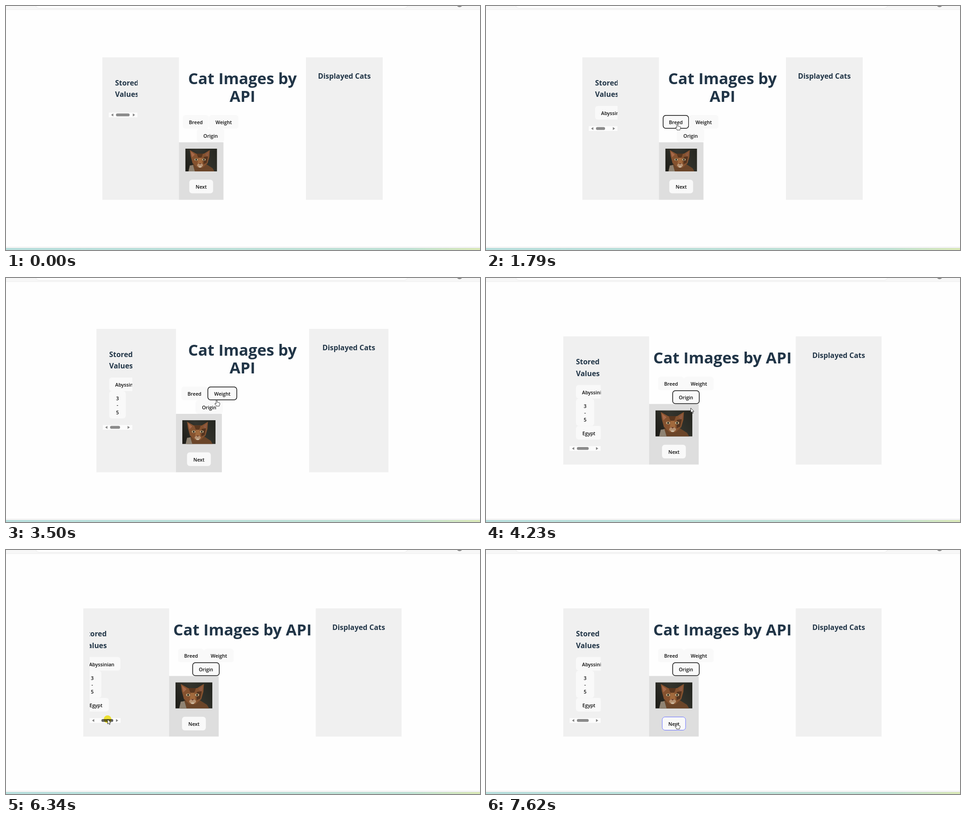
An HTML page with a canvas for the animation above (8 s loop, 1043 by 537 pixels).

```html
<!DOCTYPE html>
<html lang="en">
<head>
<meta charset="utf-8">
<title>Cat Images by API</title>
<style>
html, body { margin: 0; width: 100%; height: 100%; overflow: hidden; background: #fefefe; }
canvas { display: block; }
</style>
</head>
<body>
<canvas id="stage" width="1043" height="537"></canvas>
<script>
const ctx = document.getElementById('stage').getContext('2d');
const LOOP = 8000;
const FAMILY = '"Open Sans", "Noto Sans", sans-serif';
const INK = '#213547';

// The page re-centres itself each time the stored list grows.
const layouts = [
  { from: 0, top: 113, bottom: 426.5, left: 212, mid: 380.5, right: 660, end: 829, clip: 63.5,
    boxTop: 300, boxEnd: 478.5, imgH: 50, breed: 389, origin: 420.2 },
  { from: 2900, top: 112, bottom: 427.5, left: 199, mid: 374, right: 667, end: 841.5, clip: 65,
    boxTop: 299, boxEnd: 475, imgH: 52.5, breed: 386, origin: 417 },
  { from: 4230, top: 128.5, bottom: 410.5, left: 170, mid: 359, right: 681.5, end: 870.5, clip: 68.5,
    boxTop: 277.3, boxEnd: 468, imgH: 57.5, breed: 378.5, origin: 410 }
];

// Pointer path: time, x, y
const path = [
  [310, 934, 505], [520, 519, 323], [790, 519, 323], [1330, 421, 260],
  [2060, 421, 260], [2450, 466, 258], [3440, 466, 258], [3500, 463.5, 269], [3770, 450.5, 286],
  [4370, 450.5, 286], [5090, 213.5, 372.5], [5500, 213.5, 372.5], [6340, 223.5, 372.5],
  [6750, 213.5, 372.5], [6950, 213.5, 372.5], [7620, 420, 381]
];
const hovers = { Breed: [1130, 2200], Weight: [2260, 3500], Origin: [3500, 4230], Next: [7340, LOOP] };
const clicks = [[1520, 1790], [2710, 2900], [4040, 4230], [5360, 6750]];

const hand = new Path2D('M-1.2 7V.6Q0-1 1.2 .6V4.6Q2.4 3.8 3.3 5Q4.5 4.4 5.2 5.5Q6.8 5 7 6.5V9.2L5.8 11.8V13H-.8V12L-3.8 8.2Q-4 6.4-2.4 6.9L-1.2 8Z');
const arrow = new Path2D('M0 0V10.4L2.4 8.2L4 11.8L5.6 11L4.1 7.6H7.2Z');

const between = (t, [a, b]) => t >= a && t < b;

function pointerAt(t) {
  const i = path.findIndex(p => p[0] > t);
  if (i < 0) return path[path.length - 1].slice(1);
  const [t0, x0, y0] = path[i - 1], [t1, x1, y1] = path[i];
  const k = (t - t0) / (t1 - t0), e = k * k * (3 - 2 * k);
  return [x0 + (x1 - x0) * e, y0 + (y1 - y0) * e];
}

function rect(x, y, x2, y2, color) {
  ctx.fillStyle = color;
  ctx.fillRect(x, y, x2 - x, y2 - y);
}

function round(x, y, w, h, r, fill, stroke, line = 1) {
  ctx.beginPath();
  ctx.roundRect(x, y, w, h, r);
  if (fill) { ctx.fillStyle = fill; ctx.fill(); }
  if (stroke) { ctx.strokeStyle = stroke; ctx.lineWidth = line; ctx.stroke(); }
}

function polygon(color, ...points) {
  ctx.fillStyle = color;
  ctx.beginPath();
  for (let i = 0; i < points.length; i += 2) ctx.lineTo(points[i], points[i + 1]);
  ctx.fill();
}

function oval(x, y, rx, ry, color) {
  ctx.fillStyle = color;
  ctx.beginPath();
  ctx.ellipse(x, y, rx, ry, 0, 0, 7);
  ctx.fill();
}

function text(s, x, y, size, weight = 700, color = INK, align = 'center') {
  ctx.font = `${weight} ${size}px ${FAMILY}`;
  ctx.textAlign = align;
  ctx.fillStyle = color;
  ctx.fillText(s, x, y);
}

function button(lines, x, y, w, h = 30) {
  round(x, y, w, h, 6, '#f9f9f9');
  lines.forEach((s, i) => text(s, x + w / 2, y + 20 + i * 15.3, 10.7, 600, '#0b0b0b'));
}

function action(name, x, y, w, t, focused) {
  button([name], x, y, w);
  if (name === focused) {
    round(x + .7, y + .7, w - 1.4, 28.6, 6, null, '#101010', 1.5);
  } else if (between(t, hovers[name])) {
    ctx.globalAlpha = Math.min(1, (t - hovers[name][0]) / 250);
    round(x + .5, y + .5, w - 1, 29, 6, null, '#646cff');
    ctx.globalAlpha = 1;
  }
}

function browserFrame() {
  rect(0, 0, 1043, 537, '#fefefe');
  rect(0, 0, 1043, 7.5, '#f7f7f7');
  rect(0, 7.5, 1043, 8.5, '#ececec');
  round(65, -14, 819, 19, 8, '#fff', '#ebebeb');
  oval(998, -4, 7, 6.5, '#858585');
  rect(0, 530.5, 1043, 531.5, '#dcdcdc');
  rect(0, 531.5, 1043, 533, '#f4f5f5');
  const strip = ctx.createLinearGradient(0, 0, 1043, 0);
  strip.addColorStop(0, '#a9d8d6');
  strip.addColorStop(.85, '#b2dccd');
  strip.addColorStop(1, '#d3e4a8');
  rect(0, 533, 1043, 537, strip);
  rect(0, 535.5, 1043, 537, 'rgba(255,255,255,.35)');
}

function photo(x, y, w, h) {
  ctx.save();
  ctx.translate(x, y);
  ctx.scale(w / 70, h / 50);
  ctx.beginPath();
  ctx.rect(0, 0, 70, 50);
  ctx.clip();
  const back = ctx.createLinearGradient(0, 40, 70, 0);
  back.addColorStop(0, '#1e1d18');
  back.addColorStop(.5, '#34342d');
  back.addColorStop(1, '#24251f');
  rect(0, 0, 70, 50, back);
  polygon('#6b4529', 10, 50, 16, 35, 46, 34, 60, 43, 64, 50);
  polygon('#8f8373', 7, 50, 10, 37, 17, 36, 21, 50);
  polygon('#85522f', 10, 3, 24, 11, 41, 11, 54, 3, 53, 18, 49, 32, 38, 42, 27, 42, 16, 32, 12, 17);
  polygon('#a8694a', 12, 6, 21, 13, 15, 19);
  polygon('#8e5a42', 52, 6, 44, 13, 50, 19);
  polygon('#5a371f', 25, 11, 39, 11, 36, 19, 32, 22, 28, 19);
  polygon('#a26a3d', 29, 20, 36, 20, 38, 33, 27, 33);
  polygon('#54341f', 41, 18, 50, 17, 47, 31, 40, 34);
  for (const eye of [24, 41]) {
    oval(eye, 24, 4, 2.5, '#b9a27c');
    oval(eye, 24, 1.5, 1.9, '#20211a');
  }
  oval(32.5, 36.5, 6.5, 4.2, '#b69272');
  polygon('#70402d', 29.5, 32, 35.5, 32, 32.5, 35);
  oval(32.5, 40, 3.2, 1.5, '#d0bda5');
  ctx.restore();
}

function storedPanel(L, t, scroll) {
  const clipX = L.left + 14, x = clipX + 14 - scroll * 28.3, y = L.top + 107;
  rect(L.left, L.top, L.mid, L.bottom, '#f0f0f0');
  ctx.save();
  ctx.beginPath();
  ctx.rect(clipX, L.top, L.clip, L.bottom - L.top);
  ctx.clip();
  text('Stored', x, L.top + 61.5, 15.9, 700, INK, 'left');
  text('Values', x, L.top + 87, 15.9, 700, INK, 'left');
  let listH = 0;
  if (t >= 1790) { button(['Abyssinian'], x, y, 82); listH = 30; }
  if (t >= 2900) { button(['3', '-', '5'], x, y + 30, L.clip - 28.5, 60); listH = 90; }
  if (t >= 4230) { button(['Egypt'], x, y + 90, 56.5); listH = 120; }

  const barY = y + listH + 14.5, midY = barY + 5.2, end = clipX + L.clip;
  const thumbW = [30, 20, 22, 26][Math.round(listH / 40)];
  rect(clipX, barY, end, barY + 10.5, '#fcfcfc');
  polygon('#858585', clipX + 5.2, midY, clipX + 10.2, midY - 3.2, clipX + 10.2, midY + 3.2);
  polygon('#858585', end - 5.5, midY, end - 10.5, midY - 3.2, end - 10.5, midY + 3.2);
  round(clipX + 16 + scroll * 10, midY - 3.1, thumbW, 6.2, 3.1,
    between(t, [5060, 7010]) ? '#636363' : '#8b8b8b');
  ctx.restore();
}

function draw(t) {
  const L = layouts.findLast(l => t >= l.from);
  const focused = t >= 4040 ? 'Origin' : t >= 2710 ? 'Weight' : t >= 1600 ? 'Breed' : '';
  const [px, py] = t >= 310 ? pointerAt(t) : [-50, -50];
  const scroll = between(t, [5360, 6750]) ? (px - 213.5) / 10 : 0;

  browserFrame();
  storedPanel(L, t, scroll);
  rect(L.right, L.top, L.end, L.bottom, '#f0f0f0');
  text('Displayed Cats', (L.right + L.end) / 2, L.top + 47, 15.9);

  const title = t < 4230 ? ['Cat Images by', 'API'] : ['Cat Images by API'];
  title.forEach((s, i) => text(s, 520.3, L.top + 59 + i * 39, 34.4));

  rect(L.mid, L.boxTop, L.boxEnd, L.bottom, '#dedede');
  photo(L.mid + 14, L.boxTop + 14, L.boxEnd - L.mid - 28, L.imgH);
  action('Breed', L.breed, L.boxTop - 60, 57.5, t, focused);
  action('Weight', L.breed + 57.5, L.boxTop - 60, 65, t, focused);
  action('Origin', L.origin, L.boxTop - 30, 60, t, focused);
  action('Next', (L.mid + L.boxEnd) / 2 - 26.2, L.boxTop + L.imgH + 32.2, 52.4, t, focused);

  if (clicks.some(c => between(t, c))) {
    ctx.globalCompositeOperation = 'multiply';
    oval(px, py, 8.5, 8.5, '#fbee35');
    ctx.globalCompositeOperation = 'source-over';
  }
  if (t >= 310) {
    const shape = Object.values(hovers).some(h => between(t, h)) ? hand : arrow;
    ctx.save();
    ctx.translate(px, py);
    ctx.fillStyle = '#fff';
    ctx.strokeStyle = '#222';
    ctx.lineWidth = .9;
    ctx.lineJoin = 'round';
    ctx.fill(shape);
    ctx.stroke(shape);
    ctx.restore();
  }
}

const start = performance.now();
function tick() {
  draw((performance.now() - start) % LOOP);
  requestAnimationFrame(tick);
}
tick();
</script>
</body>
</html>
```
